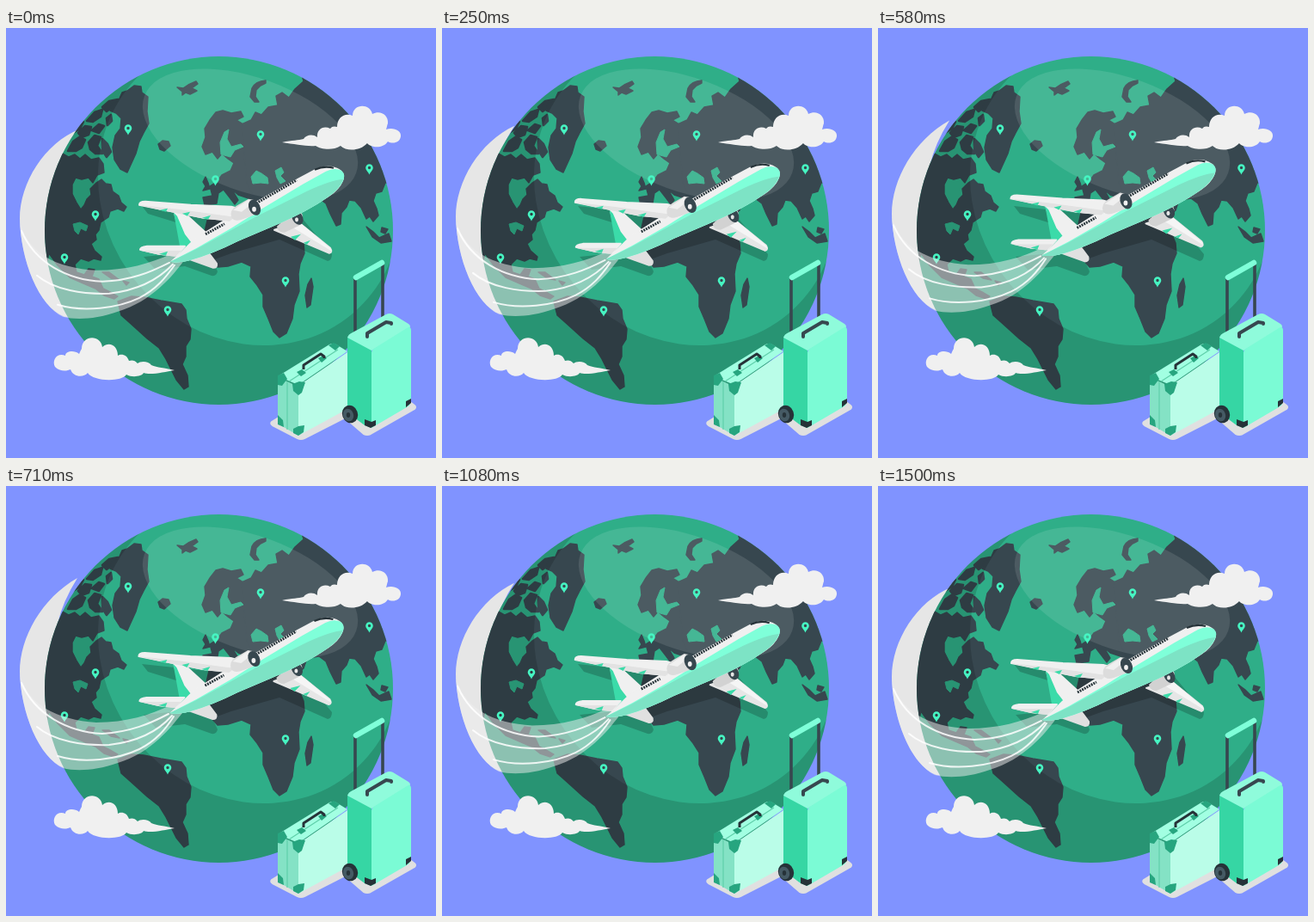
An HTML page for the animation above (1540 ms loop, 500x500 px).

```html
<!DOCTYPE html>
<html lang="en">
<head>
<meta charset="utf-8">
<title>Travel</title>
<style>
html, body { margin: 0; width: 100%; height: 100%; overflow: hidden; background: #8093ff; }
svg { display: block; width: 100vw; height: 100vh; }
.land { fill: #37474f; stroke: #37474f; stroke-width: 1.4; stroke-linejoin: round; }
.sea { fill: #2fae88; stroke: #2fae88; stroke-width: 1; stroke-linejoin: round; }
.streak { fill: none; stroke: #fff; stroke-width: 2; stroke-linecap: round; opacity: .85; }
.soft { stroke-linejoin: round; stroke-width: 2; }
</style>
</head>
<body>
<svg viewBox="0 0 500 500">
  <defs>
    <clipPath id="disc"><circle cx="247.5" cy="235.5" r="202.5"/></clipPath>
    <mask id="dusk">
      <rect width="500" height="500" fill="#fff"/>
      <ellipse cx="283" cy="190" rx="186" ry="168.6" transform="rotate(50 283 190)"/>
    </mask>
    <path id="pin" fill="#46f5c2" fill-rule="evenodd" d="M0 6.5C-1.5 3-4.3 1.5-4.3-1.4A4.3 4.3 0 0 1 4.3-1.4C4.3 1.5 1.5 3 0 6.5ZM0-3.2A1.7 1.7 0 1 0 0 .2A1.7 1.7 0 1 0 0-3.2Z"/>
  </defs>
  <rect width="500" height="500" fill="#8093ff"/>
  <path id="back" fill="#e6e6e6"/>

  <g clip-path="url(#disc)">
    <rect width="500" height="500" fill="#2fae88"/>
    <g class="land">
      <!-- North America -->
      <path d="M40 300L40 160L60 152L66 146L73 150L80 147L86 152L92 147L99 153L108 151L113 158L114 168L106 171L101 180L96 174L88 176L81 174L77 182L77 193L82 203L87 211L91 206L94 199L99 194L98 187L105 180L111 176L116 181L122 182L124 190L131 195L134 203L140 208L137 213L130 210L121 213L119 220L110 226L108 235L104 240L105 246L99 251L103 259L111 266L110 270L102 268L96 271L87 268L80 275L82 284L91 287L96 280L103 281L100 289L108 292L113 303L123 308L130 312L126 315L114 311L104 303L90 297L74 290L60 276L50 262Z"/>
      <!-- Arctic islands -->
      <path stroke-width="2.6" d="M72 143L78 132L85 127L92 130L88 139L81 143ZM84 122L92 114L99 115L96 124L88 127ZM94 108L103 98L112 95L110 103L101 109ZM112 92L120 85L130 83L126 90L117 97ZM100 119L108 112L114 114L108 122ZM96 133L103 125L110 127L106 137L112 146L104 146L98 141ZM112 129L118 135L122 144L117 150L112 142ZM117 105L122 101L123 108L118 113ZM78 122L86 111L90 109L86 117Z"/>
      <!-- Greenland, Iceland, northern islands -->
      <path d="M135 75L141 73L149 67L157 68L158 75L165 80L164 97L166 111L160 122L155 132L151 146L146 157L141 168L133 164L126 153L124 139L127 125L133 117L134 105L128 99L121 96L123 87L131 84Z"/>
      <path d="M177 135L182 131L189 132L191 137L184 143L179 141Z"/>
      <path d="M199 69L206 70L212 66L221 62L223 65L216 70L222 73L214 77L209 75L205 78L205 74Z"/>
      <path d="M302 61Q290 62 286 70L284 80L289 86L294 86L290 80L291 72L296 67L302 64Z"/>
      <!-- Europe -->
      <path d="M244 98L252 96L262 99L273 97L276 103L268 107L276 112L320 110L330 220L300 222L292 205L282 198L270 194L263 188L270 200L266 205L260 197L253 188L247 192L245 204L231 206L229 197L240 195L237 184L246 178L251 171L261 166L265 157L258 152L251 146L246 152L240 144L232 147L228 138L232 127L231 117L237 107Z"/>
      <path d="M229 189L232 184L229 179L232 173L235 180L237 187Z"/>
      <!-- Asia -->
      <path d="M274 112L285 107L290 98L297 101L305 92L316 90L314 79L321 75L329 81L336 71L346 62L340 40L470 90L470 178L441 180L437 190L430 192L427 201L431 210L433 218L427 225L423 219L419 222L413 209L406 201L399 200L396 208L390 215L389 228L384 230L377 216L372 204L364 198L350 200L346 212L330 226L300 220L280 180Z"/>
      <path d="M419 231L427 237L434 244L445 239L448 248L436 250L426 243ZM437 232L444 234L441 239L436 237Z"/>
      <!-- Africa -->
      <path d="M236 215L262 208L290 214L330 222L341 238L346 250L347 262L342 274L340 286L341 306L335 322L333 338L326 355L318 360L311 353L305 338L299 324L299 310L292 299L284 289L285 277L274 272L258 277L246 278L234 264L228 250Z"/>
      <path d="M355 291L357 301L354 322L350 325L348 311L351 298Z"/>
      <!-- South America and Caribbean -->
      <path d="M130 318L146 312L160 313L180 317L204 321L209 328L210 338L215 350L214 362L209 370L209 382L205 391L211 404L212 417L207 420L198 409L192 397L186 385L178 372L164 361L153 351L143 342L134 334Z"/>
      <path d="M112 284L120 284L132 293L122 291ZM136 294L143 296L140 299Z"/>
    </g>
    <g class="sea">
      <path d="M250 147L249 133L254 121L259 118L257 129L262 138L273 135L276 138L266 142L261 150Z"/>
      <path d="M285 173L291 166L297 169L304 174L305 181L296 180L287 181Z"/>
      <path d="M313 166L320 162L323 168L319 172L325 178L319 181L315 174Z"/>
      <path d="M78 228L86 226L95 230L93 236L87 233L84 240L80 236Z"/>
    </g>
    <rect width="500" height="500" opacity=".15" mask="url(#dusk)"/>
    <ellipse cx="284" cy="124" rx="131" ry="66" transform="rotate(20 284 124)" fill="#fff" opacity=".105"/>
    <path fill="#000" opacity=".2" d="M158 207L262 218L340 216L379 263Q379 270 374 271L318 246L262 262L240 270L246 283Q245 289 239 288L208 277L174 281L160 266L200 262L212 252L230 236L165 216Z"/>
  </g>
  <g id="pins"></g>

  <path id="ribbon" fill="#f0f0f0" opacity=".5"/>
  <path class="streak"/><path class="streak"/><path class="streak"/>

  <g id="plane">
    <!-- far wing and engine -->
    <path class="soft" fill="#e6e6e6" stroke="#e6e6e6" d="M312 235L340 226L377 256Q380 261 376 262L350 251Z"/>
    <path fill="#f5f5f5" d="M330 230L341 226L377 256L379 260Z"/>
    <path fill="#3bdba9" d="M331 243L343 240L336 247ZM346 250L354 247L350 252Z"/>
    <path fill="#d2d2d2" d="M315 231L333 214Q344 211 345 219L341 230L324 238Q316 238 315 231Z"/>
    <ellipse cx="339" cy="221" rx="6" ry="8.5" transform="rotate(-28 339 221)" fill="#37474f"/>
    <ellipse cx="338" cy="223" rx="2" ry="2.6" fill="#e6e6e6"/>
    <!-- tail -->
    <path class="soft" fill="#e0e0e0" stroke="#e0e0e0" d="M213 269L236 262L245 274Q246 279 241 279Z"/>
    <path class="soft" fill="#f0f0f0" stroke="#f0f0f0" d="M196 215L208 216L232 238L214 256L207 256Z"/>
    <path fill="#3bdba9" d="M195 215L199 219L208 240L218 253L203 259Z"/>
    <!-- fuselage -->
    <path fill="#f0f0f0" d="M191 272Q204 260 214 250Q222 243 232 237L262 218L330 180L360 164Q374 158 385 163Q396 168 392 178Q388 188 376 196Q350 214 310 231L270 248Q240 263 215 270Q200 274 191 272Z"/>
    <path fill="#7fffd9" d="M191 272L222 256L262 233L300 209L345 182L372 167Q382 162 390 166Q396 171 391 180Q386 189 374 197Q350 214 310 231L270 248Q240 263 215 270Q200 274 191 272Z"/>
    <path fill="#7de3c5" d="M191 272L220 258L290 220L350 190Q378 177 392 176Q388 188 374 197Q350 214 310 231L270 248Q240 263 215 270Q200 274 191 272Z"/>
    <path fill="none" stroke="#263238" stroke-width="2.2" d="M359 165Q370 160 381 163"/>
    <path fill="none" stroke="#263238" stroke-width="3" stroke-dasharray="1.9 1.1" d="M232 240L254 228M291 204L338 177"/>
    <!-- near wing and engine -->
    <path class="soft" fill="#f0f0f0" stroke="#f0f0f0" d="M155 206Q155 202 162 202L215 206L262 208L284 214L262 224L230 221L180 211Z"/>
    <path fill="#e2e2e2" d="M154 206L200 211L266 220L260 225L230 222L180 212Z"/>
    <path fill="#3bdba9" d="M179 212L188 210L186 214ZM205 216L214 214L211 219ZM228 221L238 218L235 223Z"/>
    <path fill="#dcdcdc" d="M262 220Q260 212 268 207L282 199Q294 200 295 210L288 218L274 223Q265 226 262 220Z"/>
    <path fill="#f0f0f0" d="M264 212L282 200L288 203L274 214Z"/>
    <ellipse cx="289" cy="209" rx="6.5" ry="9.5" transform="rotate(-25 289 209)" fill="#37474f"/>
    <ellipse cx="288.5" cy="211" rx="2.4" ry="3" fill="#f0f0f0"/>
    <path class="soft" fill="#f0f0f0" stroke="#f0f0f0" d="M156 258Q156 255 164 254L208 254L198 265L178 263Z"/>
    <path fill="#e2e2e2" d="M156 259L204 259L197 266L178 264Z"/>
    <path fill="#3bdba9" d="M178 263L188 260L186 265Z"/>
  </g>

  <g fill="#f0f0f0">
    <path d="M321 133C333 130 340 131 346 129C349 124 357 123 362 127C361 118 369 113 377 117C379 114 382 114 385 115C385 104 394 98 403 102C403 88 423 87 426 100C435 95 445 101 444 111C443 113 443 115 442 118C450 115 460 119 459 126C458 134 449 135 444 132C438 141 424 139 420 134C412 143 396 144 389 137C380 143 366 141 360 137C350 138 336 135 321 133Z"/>
    <path d="M196 398C184 395 176 395 169 392C166 387 156 387 153 390C150 386 146 386 143 387C141 380 134 378 130 381C130 369 120 364 112 371C110 356 88 357 88 373C86 376 86 377 85 379C79 374 69 376 69 381C59 377 53 387 57 394C63 400 71 399 75 397C78 406 90 407 95 401C101 411 134 412 140 403C147 407 158 405 160 401C168 404 184 400 196 398Z"/>
  </g>

  <!-- luggage -->
  <path class="soft" fill="#e0e0e0" stroke="#e0e0e0" d="M309 458Q307 460 310 462L339 477Q343 479 347 477L394 453L416 472Q420 474 424 472L475 443Q477 441 475 439L466 432L400 425L330 445Z"/>
  <g>
    <path fill="#84e2c5" d="M316 406L340 417V474L316 460Z"/>
    <path fill="#a2ffe2" d="M316 405L376 368Q380 366 384 368L397 376L340 415Z"/>
    <path fill="#bafde8" d="M340 416L397 377V443L340 474Z"/>
    <path fill="none" stroke="#5fcfaa" stroke-width="1.2" d="M327 411V467M329 411L386 374"/>
    <path fill="#27a57f" d="M316 404L323 401L327 408L321 416L316 415ZM333 414L341 411L348 412L344 424L340 427L334 422ZM316 450L322 456L323 464L316 461ZM334 466L340 463L347 462L346 470L340 474L334 471ZM375 369L381 366L388 370L383 375Z"/>
    <path fill="#27a57f" d="M338 400L344 397L349 401L343 405ZM363 384L369 381L373 384L367 389Z"/>
    <path fill="none" stroke="#263238" stroke-width="3" stroke-linejoin="round" d="M346 397V392L366 379L370 382V384"/>
  </g>
  <g>
    <path fill="none" stroke="#37474f" stroke-width="3.6" d="M406 358V290M438 338V272"/>
    <path fill="none" stroke="#7fffd9" stroke-width="6.5" stroke-linecap="round" d="M407 290L437 273"/>
    <path fill="#36d6a4" d="M397 362Q397 357 402 359L425 373V465L417 462L397 447Z"/>
    <path fill="#8ffbdb" d="M397 360Q398 356 403 354L442 333Q446 331 450 333L468 344Q472 347 468 350L425 375Z"/>
    <path fill="#7bfbd5" d="M425 378Q425 374 429 372L466 349Q471 346 471 352V433Q471 438 466 441L425 465Z"/>
    <path fill="#263238" d="M417 455L425 458L430 456V462L424 465L417 462ZM465 434L471 431V436L465 441Z"/>
    <path fill="none" stroke="#37474f" stroke-width="4" stroke-linejoin="round" stroke-linecap="round" d="M420 359V355L442 342L448 343V344"/>
    <ellipse cx="400" cy="449" rx="9" ry="10.5" transform="rotate(-20 400 449)" fill="#263238"/>
    <ellipse cx="398" cy="450" rx="6" ry="7.5" transform="rotate(-20 398 450)" fill="#455a64"/>
    <ellipse cx="398" cy="450" rx="2.2" ry="3" fill="#263238"/>
  </g>
</svg>
<script>
const LOOP = 1540, PEAK = 690;
const $ = s => document.querySelector(s);

$('#pins').innerHTML = [[142, 118], [104, 218], [68, 268], [188, 329], [325, 295], [243.5, 177], [296, 125], [422.5, 164]]
  .map(([x, y]) => `<use href="#pin" x="${x}" y="${y}"/>`).join('');

// Each shape morphs from its low pose to its high pose.
const streaks = document.querySelectorAll('.streak');
const morphs = [
  [$('#back'),
    'M85 118C45 134 16 180 16 222C17 270 38 325 68 336L100 338L120 220L62 168Q70 140 85 118Z',
    'M83 107C42 130 16 176 16 216C17 262 38 317 68 328L100 330L120 212L60 160Q66 134 83 107Z'],
  [$('#ribbon'),
    'M16 222C22 262 60 280 105 282C140 282 168 274 192 263L206 272C194 288 170 318 130 330C104 339 82 340 66 336C38 322 17 270 16 222Z',
    'M16 216C22 254 60 272 105 275C140 275 168 266 191 255L205 264C192 280 170 310 130 322C104 331 82 332 66 328C38 314 17 262 16 216Z'],
  [streaks[0],
    'M18 236C34 274 72 293 112 295C145 294 168 284 190 273',
    'M18 229C34 266 72 286 112 288C145 286 168 276 189 265'],
  [streaks[1],
    'M36 288C56 305 90 310 120 309C155 305 178 292 194 275',
    'M36 280C56 297 90 302 120 301C155 297 178 284 193 267'],
  [streaks[2],
    'M60 322C90 331 130 326 155 314C175 304 186 290 196 276',
    'M60 314C90 323 130 318 155 306C175 296 186 282 195 268']
];

function mix(a, b, p) {
  const to = b.match(/-?[\d.]+/g);
  let i = 0;
  return a.replace(/-?[\d.]+/g, n => (+n + (to[i++] - n) * p).toFixed(2));
}

function draw(now) {
  const p = .5 + .5 * Math.cos((now % LOOP - PEAK) / LOOP * 2 * Math.PI);
  for (const [el, low, high] of morphs) el.setAttribute('d', mix(low, high, p));
  $('#plane').setAttribute('transform', `translate(${-.6 * p} ${-8 * p})`);
}

const start = performance.now();
function tick() {
  draw(performance.now() - start);
  requestAnimationFrame(tick);
}
tick();
</script>
</body>
</html>
```
